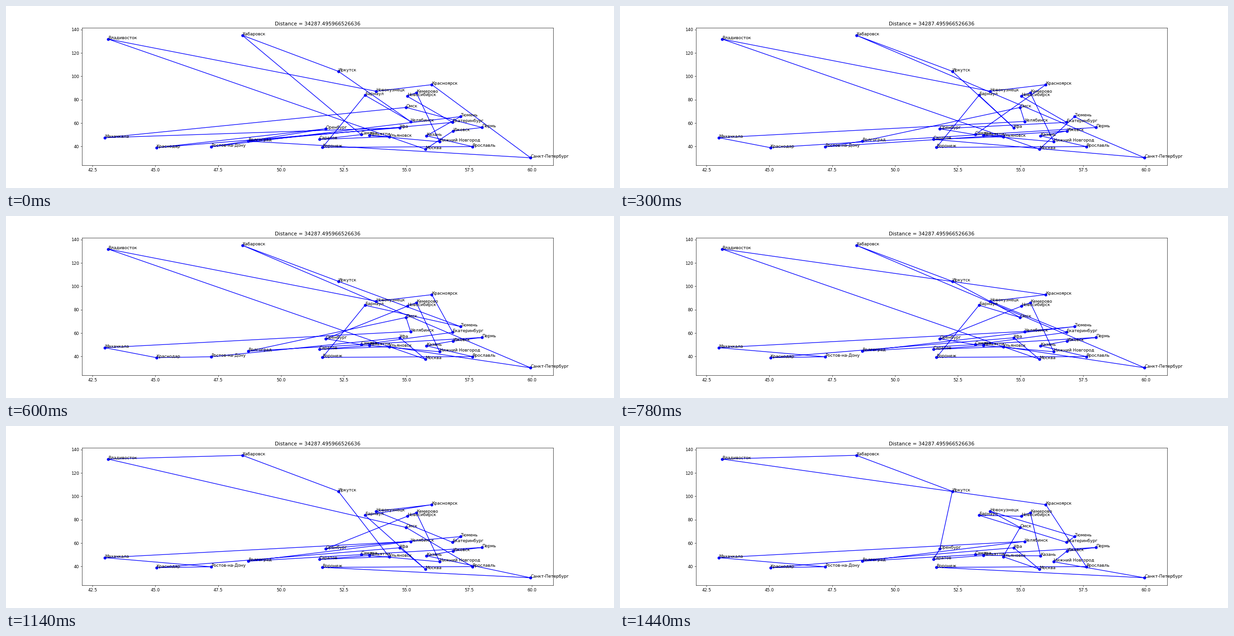
Animation, 1280 px wide and 384 px high, one loop 1.5 s. Source, as a matplotlib script:

```python
import matplotlib.pyplot as plt
from matplotlib.animation import FuncAnimation

plt.rcParams["font.family"] = "DejaVu Sans"

# Latitude and longitude of each city, in the order of the first tour
PLACES = {
    "Ростов-на-Дону": (47.22, 39.72),
    "Оренбург": (51.79, 55.10),
    "Краснодар": (45.04, 38.98),
    "Уфа": (54.735, 55.96),
    "Махачкала": (42.983, 47.50),
    "Омск": (54.985, 73.37),
    "Пермь": (58.01, 56.23),
    "Ижевск": (56.853, 53.21),
    "Москва": (55.754, 37.62),
    "Владивосток": (43.116, 131.88),
    "Новокузнецк": (53.794, 87.21),
    "Красноярск": (56.009, 92.85),
    "Санкт-Петербург": (59.939, 30.32),
    "Волгоград": (48.707, 44.52),
    "Екатеринбург": (56.839, 60.61),
    "Новосибирск": (55.029, 82.92),
    "Кемерово": (55.391, 86.05),
    "Нижний Новгород": (56.324, 44.01),
    "Тольятти": (53.52, 49.39),
    "Ульяновск": (54.308, 48.37),
    "Саратов": (51.533, 46.03),
    "Самара": (53.195, 50.11),
    "Хабаровск": (48.465, 135.06),
    "Иркутск": (52.286, 104.28),
    "Челябинск": (55.16, 61.40),
    "Барнаул": (53.348, 83.78),
    "Воронеж": (51.659, 39.20),
    "Ярославль": (57.622, 39.90),
    "Казань": (55.794, 49.11),
    "Тюмень": (57.153, 65.53),
}

# One move per step: the two named cities trade places in the tour
MOVES = """
Ижевск/Тюмень, Уфа/Челябинск, Краснодар/Омск, Санкт-Петербург/Самара,
Оренбург/Волгоград, Ростов-на-Дону/Пермь, Ульяновск/Саратов, Тюмень/Уфа,
Самара/Оренбург, Оренбург/Екатеринбург, Краснодар/Ростов-на-Дону,
Омск/Тюмень, Новокузнецк/Красноярск, Владивосток/Иркутск,
Санкт-Петербург/Барнаул, Санкт-Петербург/Ярославль, Тюмень/Самара,
Волгоград/Самара, Иркутск/Барнаул, Красноярск/Омск,
Нижний Новгород/Казань, Екатеринбург/Тюмень, Барнаул/Оренбург,
Оренбург/Ульяновск
"""
SWAPS = [move.strip().split("/") for move in MOVES.split(",")]


def tour_at(step):
    tour = list(PLACES)
    for a, b in SWAPS[:step]:
        i, j = tour.index(a), tour.index(b)
        tour[i], tour[j] = b, a
    return tour + tour[:1]


def padded(values, pixels, radius=8 / 3, margin=0.05):
    """Limits that leave room for the dots plus the usual margin."""
    lo, hi = min(values), max(values)
    pad = radius * (hi - lo) * (1 + 2 * margin) / pixels
    lo, hi = lo - pad, hi + pad
    extra = margin * (hi - lo)
    return lo - extra, hi + extra


def draw(step):
    route.set_data(*zip(*(PLACES[name] for name in tour_at(step))))
    return [route]


fig, ax = plt.subplots(figsize=(20, 6), dpi=64)
fig.subplots_adjust(left=0.125, right=0.9, bottom=0.125, top=0.88)
lats, lons = zip(*PLACES.values())
ax.set_xlim(padded(lats, ax.bbox.width))
ax.set_ylim(padded(lons, ax.bbox.height))
ax.set_title("Distance = 34287.495966526636")

route, = ax.plot([], [], color="blue", lw=1.5)
ax.scatter(lats, lons, s=36, color="blue")
for name, spot in PLACES.items():
    ax.text(*spot, name)

anim = FuncAnimation(fig, draw, frames=len(SWAPS) + 1, interval=60,
                     repeat=True, repeat_delay=0)
plt.show()
```
